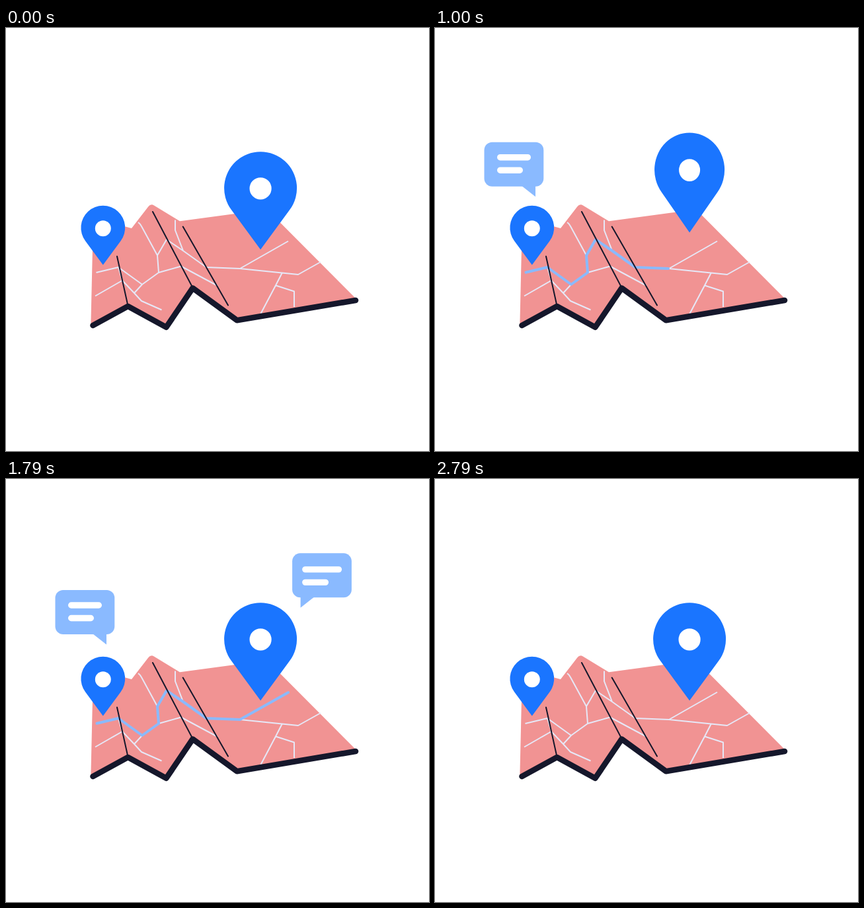
An HTML page for the animation above (2870 ms loop, 640x640 px).

```html
<!DOCTYPE html>
<html lang="en">
<head>
<meta charset="utf-8">
<title>Map route</title>
<style>
  html, body { margin: 0; width: 100%; height: 100%; overflow: hidden; background: #fff; }
  svg { display: block; width: 100vw; height: 100vh; }
  .line { fill: none; stroke-linejoin: round; }
  .round { stroke-linecap: round; }
</style>
</head>
<body>
<svg viewBox="0 0 640 640">
  <defs>
    <path id="drop" d="M0 0L-44-60A55 55 0 1 1 44-60Z" fill="#1a75ff"/>
  </defs>

  <path fill="#f19393" d="M128.4 448L132 287.5L190 303L215.5 270Q219 265.5 224 268.5L263 292.3L391 275Q395 274.5 398 277.5L531 411L349.5 442.5L282.5 393.5L242.5 453L184.5 421L131.5 450Z"/>

  <path class="line" stroke="#e6e8f7" stroke-width="2" d="M136.5 370L170 362L206 388L231 370L265 360.5L320 390
    M200 294Q203 296 205 300L229 344L231 370M229 344L243 320L268 337L303 362L354 364L442 373L476 354
    M354 364L427 322.5M256 290.5V306L268 337M135 405.5L176 382M170 362L176 382L194 401L205 413L235.5 426.5
    M206 388L194 401M417.5 371L408 389.5L385.5 432M408 389.5L436 398.5V422"/>

  <path id="route" class="line round" pathLength="1" stroke="#8abaff" stroke-width="4"
    d="M137.5 369.7L170 362L206 388L231 370L229 344L243 320L268 337L303 362L354 364L427 323"/>

  <path class="line round" stroke="#15172b" stroke-width="2" d="M168 345.5L184 418M222 278L282 392M267.7 300.5L336 419.5"/>
  <path class="line round" stroke="#15172b" stroke-width="8.6" d="M131.5 450L184.5 421L242.5 452.7L282.5 393.5L349.5 442.3L529 412"/>

  <g id="smallPin"><use href="#drop"/><circle cy="-91.2" r="19.7" fill="#fff"/></g>
  <g id="bigPin"><use href="#drop"/><circle cy="-92.5" r="16.6" fill="#fff"/></g>

  <g id="leftBubble" fill="#8abaff">
    <rect x="-77.5" y="-82.5" width="89.8" height="67" rx="12"/>
    <path d="M-21-16.5L0 0V-16.5Z"/>
    <path class="line round" stroke="#fff" stroke-width="9.4" d="M-53.3-59.5H-11.7M-53.3-40H-23.7"/>
  </g>
  <g id="rightBubble" fill="#8abaff">
    <rect x="-12.5" y="-82.5" width="89.8" height="67" rx="12"/>
    <path d="M21-16.5L0 0V-16.5Z"/>
    <path class="line round" stroke="#fff" stroke-width="9.4" d="M7.2-58H57.8M7.2-38.5H37.8"/>
  </g>
</svg>

<script>
const LOOP = 2870;
const get = id => document.getElementById(id);
const progress = (t, from, to) => Math.min(1, Math.max(0, (t - from) / (to - from)));
const smooth = x => x * x * (3 - 2 * x);
const cubic = x => x < .5 ? 4 * x ** 3 : 1 - 4 * (1 - x) ** 3;

// Eased value from [time, value] keys
function keyed(t, keys) {
  let value = keys[0][1];
  for (let i = 1; i < keys.length; i++) {
    const [from, a] = keys[i - 1], [to, b] = keys[i];
    if (t >= from) value = a + (b - a) * smooth(progress(t, from, to));
  }
  return value;
}

function place(id, x, y, sx, sy = sx) {
  get(id).setAttribute('transform', `translate(${x} ${y}) scale(${sx} ${sy})`);
}

// Squash, leap, land and settle; scaled about the tip
function jump(id, t, { x, y, size, lift, thin, tall }) {
  const height = keyed(t, [[105, 0], [320, lift], [560, 0]]);
  const scale = (squash, stretch) => size * keyed(t, [
    [0, 1], [100, squash], [210, stretch], [320, 1], [430, stretch], [590, squash], [780, 1]]);
  place(id, x, y - height, scale(1.05, thin), scale(.86, tall));
}

function bubble(id, t, x, y, drift, show, hide) {
  const grow = smooth(progress(t, show, show + 235));
  const shrink = smooth(progress(t, hide, hide + 235));
  place(id, x, y - drift * t, grow * (1 - shrink));
}

function draw() {
  const t = performance.now() % LOOP;

  jump('smallPin', t, { x: 146.8, y: 358.6, size: .607, lift: 48, thin: .948, tall: 1.045 });
  jump('bigPin', t - 570, { x: 385.1, y: 335.3, size: 1, lift: 46.5, thin: .964, tall: 1.02 });

  const head = cubic(progress(t, 460, 1340));
  const tail = cubic(progress(t, 1827, 2707));
  const route = get('route').style;
  route.visibility = head - tail > .001 ? 'visible' : 'hidden';
  route.strokeDasharray = `${head - tail} 2`;
  route.strokeDashoffset = -tail;

  bubble('leftBubble', t, 152, 261.2, .006, 510, 2500);
  bubble('rightBubble', t, 445.6, 207.4, .007, 990, 2540);

  requestAnimationFrame(draw);
}
draw();
</script>
</body>
</html>
```
